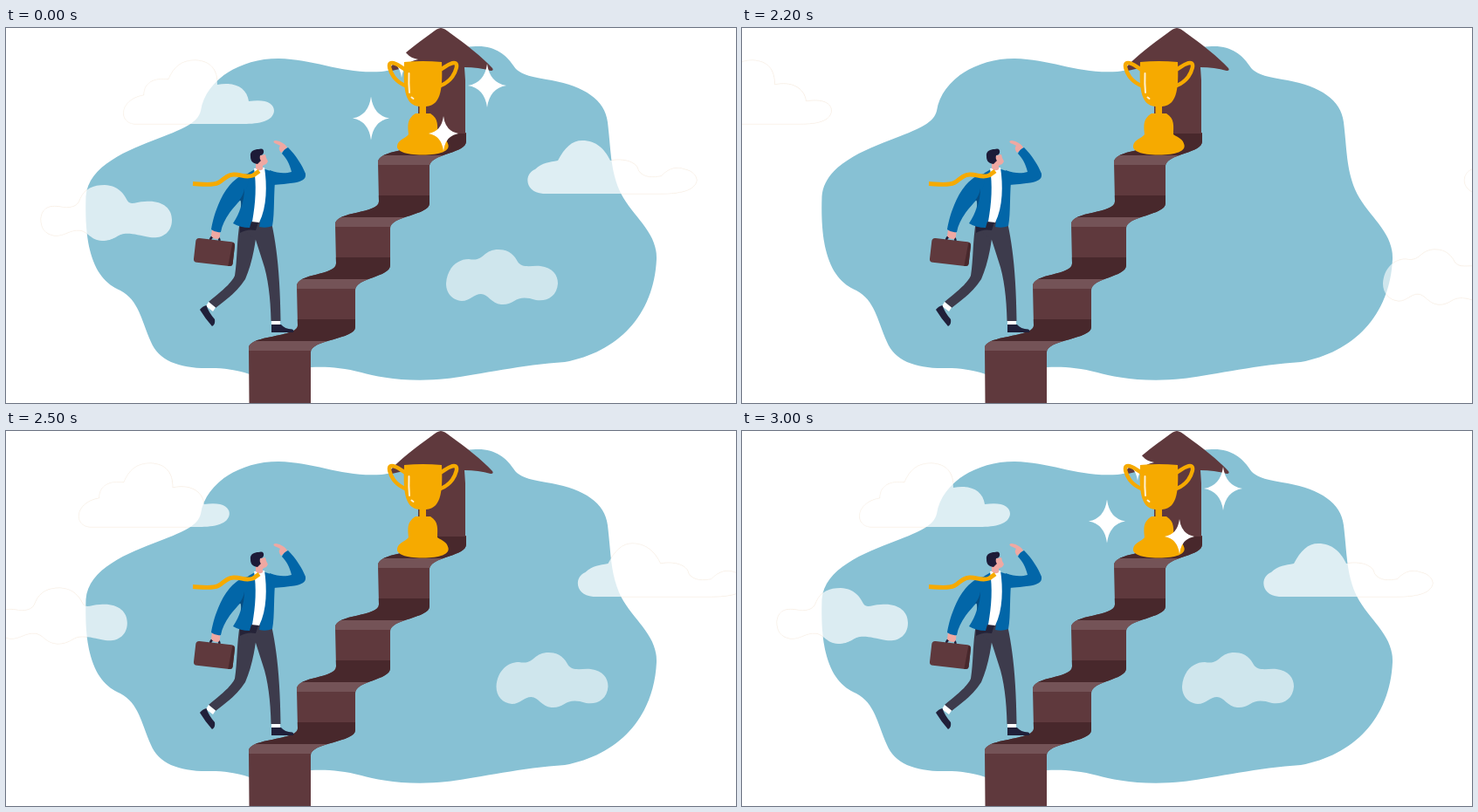
An HTML page for the animation above (4000 ms loop, 836 by 430 pixels).

```html
<!DOCTYPE html>
<html lang="en">
<head>
<meta charset="utf-8">
<title>Climbing to the trophy</title>
<style>
  html, body { margin: 0; width: 100%; height: 100%; overflow: hidden; background: #fff; }
  svg { display: block; width: 100%; height: 100%; }
</style>
</head>
<body>
<svg viewBox="0 0 836 430">
  <defs>
    <path id="star" d="M0-1Q.13-.13 1 0Q.13 .13 0 1Q-.13 .13-1 0Q-.13-.13 0-1Z"/>
    <clipPath id="ribbonClip"><path id="ribbonEdge"/></clipPath>
    <g id="leftClouds">
      <path fill-opacity=".72" d="M147 110C129 109 129 82 158 77C158 62 170 57 186 59C192 45 200 37 217 37C235 38 242 48 242 65C261 61 276 68 278 84C297 81 307 86 307 95C306 107 290 110 272 110Z"/>
      <path fill-opacity=".7" d="M40 219C41 206 50 203 62 205C72 207 82 206 85 196C90 184 100 180 113 180C129 181 135 190 139 198C143 204 149 199 159 199C178 197 190 206 190 220C190 236 177 242 165 240C152 238 145 235 135 236C127 237 124 244 110 244C96 243 95 234 85 232C72 231 68 239 55 238C44 236 40 229 40 219Z"/>
    </g>
    <g id="rightClouds">
      <path fill-opacity=".6" d="M504 293C505 275 517 265 530 265C541 267 544 263 549 259C554 255 559 254 564 254C577 254 583 262 586 268C591 276 602 272 612 273C626 275 632 283 632 293C631 308 619 314 607 312C595 308 588 309 582 313C577 316 573 317.500 567 317C556 316 552 305 544 305C536 305 531 313 522 313C511 312 504 304 504 293Z"/>
      <path fill-opacity=".73" d="M615 190C595 189 592 168 606 162C615 154 622 154 632 152C640 137 648 129 660 129C676 129 686 139 692 152C708 149 723 154 724 163C730 173 742 171 750 170C760 160 768 159 777 162C787 164 791 170 791 175C789 187 770 190 750 190Z"/>
    </g>
  </defs>

  <g fill="none" stroke="#f7ece0">
    <use href="#leftClouds"/>
    <use href="#rightClouds"/>
  </g>
  <path id="blob" fill="#87c1d4" d="M91.500 193C94 158 139 140 176 126C205 115 220 108 223 95C228 62 265 35 312 35C355 36 385 53 430 50
    C455 48 490 22 538 21C560 20 573 31 581 43C587 53 600 56 625 60C662 67 686 82 689 108C693 142 692 160 702 185
    C715 215 746 232 745 265C742 330 700 372 640 383C590 386 540 398 505 402C460 407 425 400 407 395
    C385 389 365 388 349 389C325 392 310 404 279 397C265 392 250 390 235 390C200 391 175 382 166 360
    C155 335 152 312 131 301C105 290 89 262 91.500 193Z"/>
  <g fill="#fff">
    <use href="#leftClouds"/>
    <use href="#rightClouds"/>
  </g>

  <g id="ribbon">
    <path fill="#5f393d" d="M498 0Q502 0 509 6C526 18 545 33 557 46Q559 49 555 49Q541 45 525 45L526 60V133H472V45Q457 45 442 49Q437 49 440 45C451 33 470 18 487 6Q494 0 498 0Z"/>
    <path id="ribbonFace" fill="#5f393d"/>
    <g id="shades" clip-path="url(#ribbonClip)"></g>
  </g>

  <g fill="#fff" transform="translate(453 36) scale(19 21)"><use class="star" href="#star"/></g>

  <g id="trophy" fill="#f6aa00">
    <g fill="none" stroke="#f6aa00" stroke-width="4.500" stroke-linecap="round">
      <path d="M458 48C451 44 447 40 442 40C436 40 440 50 444 56Q450 64 460 67"/>
      <path d="M497 48C504 44 508 40 513 40C519 40 515 50 511 56Q505 64 495 67"/>
    </g>
    <path d="M456 39Q477 37 499 39C500 64 500 89 481 90V98H486C496 104 494 113 494 122C500 126 505 127 506.500 134C508 141 498 145.500 477 145.500C457 145.500 447 141 448 135C449 128 457 127 461 122C460 112 459 104 469 98H473.500V90C455 89 455 64 456 39Z"/>
    <path d="M461.500 52Q461 64 462 74M464.500 79.500L466.500 81" fill="none" stroke="#fff0cf" stroke-width="2" stroke-linecap="round"/>
  </g>

  <g id="man">
    <path fill="#3d3b4c" d="M268 221L288 223C286 250 281 272 274 288C265 302 252 312 240 321L232 314C246 302 258 293 262 284C265 265 264 245 268 221Z"/>
    <path fill="#3d3b4c" d="M270 221L304 223C310 250 314 285 314.500 336H303.500C303 310 300 285 294 268L286 243L277 236Z"/>
    <path fill="#252338" d="M268 223H289L286 232Q276 230 268 235Z"/>
    <path fill="#fff" d="M304 336H314V340.500H304ZM232 314L240 320.500L237 325L229 319Z"/>
    <path fill="#20203a" d="M304 340L315 340Q319 345 328 345.500Q330 347 329 349H304ZM229.500 318Q232 326 239 334Q240 340 236 342Q228 333 222 323Q225 319 229.500 318Z"/>

    <path fill="none" stroke="#20203a" stroke-width="2.500" d="M234 244Q234 239 239 239Q245 239 244.500 245"/>
    <g transform="rotate(6.500 238 257)">
      <rect x="216" y="243" width="45" height="28" rx="4" fill="#5f393d"/>
      <path d="M258 244Q261 244 261 248V268Q261 271 256 271Z" fill="#48282c"/>
    </g>
    <path fill="#efa8a2" d="M236 231L245 233Q246 240 243 242Q236 242 235 238Z"/>

    <path fill="#0266a8" d="M270 172C278 166 285 161 290 160L300 163L309 166C306 190 308 212 305 227Q298 230 290 228L291 222L281 222L279 229Q268 229 260 224C268 212 272 200 269 190Z"/>
    <path fill="#fff" d="M284 161L296 160C299 180 299 205 290 223L282 222C286 200 287 180 284 161Z"/>
    <path fill="#0266a8" d="M279 167C263 168 250 185 243 203C238 215 236 225 235 231Q240 235 246 234C248 222 256 211 265 201C272 194 277 185 279 167Z"/>
    <path fill="#064d83" d="M273 184Q272 192 266 199Q270 194 269 207Q273 195 273 184Z"/>
    <path fill="#efa8a2" d="M315 143L322 137C320 133 315 130 309 129C305 129 306 132 310 133L314 135Q311 138 315 143Z"/>
    <path fill="#0266a8" d="M302 163C312 167 320 167 327 165C325 156 321 149 316 144Q318 139 323 137C332 146 339 157 343 167C344 174 338 176 330 177.500C318 179 310 180 304 180Z"/>

    <path fill="#efa8a2" d="M288 147L297 145L298 149L300 153L298 156Q295 157 294 158V162Q290 165 286 161V152Z"/>
    <path fill="#1d1b38" d="M280 147C279 141 285 139 289 139Q296 137 295 143Q294 146 291 146Q290 150 292 152L288 156C281 155 280 151 280 147Z"/>
    <path fill="none" stroke="#f6aa00" stroke-width="5" d="M214 178.500C224 179 236 181 243 177.500C250 174 252 168 261 168C270 168 274 172 283 169L290 164"/>
  </g>

  <g fill="#fff">
    <g transform="translate(418 103.500) scale(21 25)"><use class="star" href="#star"/></g>
    <g transform="translate(551 66) scale(22 25)"><use class="star" href="#star"/></g>
    <g transform="translate(501 121) scale(17 20)"><use class="star" href="#star"/></g>
  </g>
</svg>
<script>
const $ = id => document.getElementById(id);
const stars = document.querySelectorAll('.star');

function band(top, bottom, fill) {
  const el = document.createElementNS('http://www.w3.org/2000/svg', 'rect');
  const attrs = { x: 0, y: top, width: 836, height: bottom - top, fill };
  for (const k in attrs) el.setAttribute(k, attrs[k]);
  $('shades').append(el);
}

// A folded ribbon: risers get narrower and rise evenly; each tread is an S-curve.
function buildRibbon() {
  const x = [278, 333, 377, 426, 472];
  const width = i => 71 - 4 * i;
  const edge = (x0, y0, x1, y1) => `${x0} ${y0}C${x0} ${y0 - 15} ${x1} ${y1 + 14} ${x1} ${y1}`;
  const edgeDown = (x0, y0, x1, y1) => `${x1} ${y1}C${x1} ${y1 + 14} ${x0} ${y0 - 15} ${x0} ${y0}`;
  let left = 'M278.500 430', right = '';
  for (let i = 0; i < 4; i++) {
    const lip = 367 - 71 * i, foot = lip - 26;
    left += 'L' + edge(x[i], lip, x[i + 1] + 1, foot);
    right = 'L' + edgeDown(x[i] + width(i), lip + 5, x[i + 1] + width(i + 1), foot + 2) + right;
    band(foot - 7, lip - 8, '#48282c');
    band(lip - 8, lip + 3, '#745357');
  }
  const d = left + 'V120H527' + right + 'V430Z';
  $('ribbonFace').setAttribute('d', d);
  $('ribbonEdge').setAttribute('d', d);
}

const LOOP = 4000, TICK = 100;
const HIDE = 2000, ARRIVE = 2600, DONE = 3000;

const backOut = p => 1 + 2.7 * (p - 1) ** 3 + 1.7 * (p - 1) ** 2;

function render(ms) {
  const t = Math.floor((ms % LOOP) / TICK) * TICK;

  const away = t < HIDE ? 0 : Math.max(0, (ARRIVE - t) / (ARRIVE - HIDE));
  $('leftClouds').setAttribute('transform', `translate(${-307 * away})`);
  $('rightClouds').setAttribute('transform', `translate(${345 * away})`);

  const hidden = t >= HIDE && t <= ARRIVE;
  const size = t > ARRIVE && t < DONE ? backOut((t - ARRIVE) / (DONE - ARRIVE)) : 1;
  for (const star of stars) {
    star.setAttribute('visibility', hidden ? 'hidden' : 'visible');
    star.setAttribute('transform', `scale(${size})`);
  }
}

buildRibbon();
const start = performance.now();
function loop() {
  render(performance.now() - start);
  requestAnimationFrame(loop);
}
loop();
</script>
</body>
</html>
```
